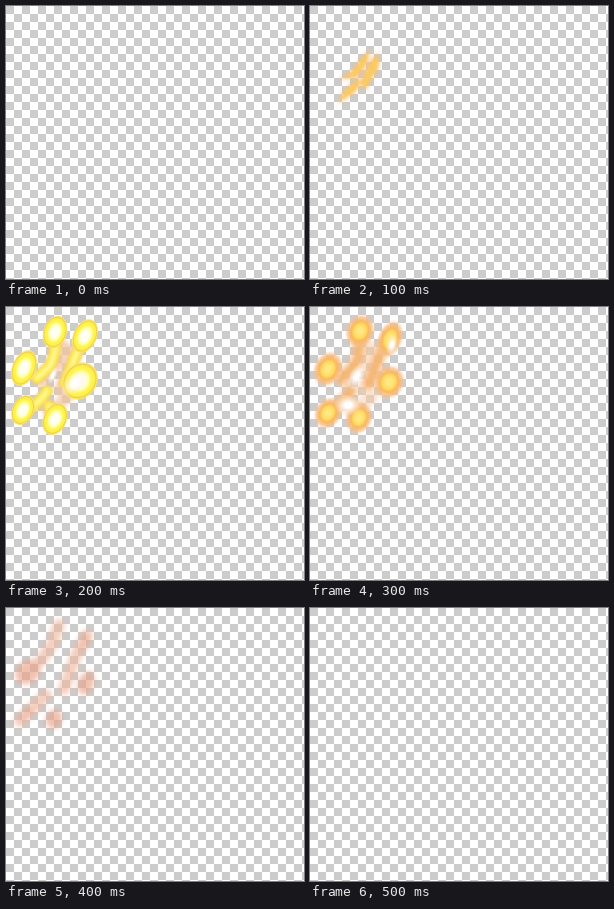
These frames come from a looping animation (298 px wide and 273 px high, 600 ms). An HTML page:

```html
<!DOCTYPE html>
<html lang="en">
<head>
<meta charset="utf-8">
<title>Spark burst</title>
<style>
html, body { margin: 0; width: 100%; height: 100%; overflow: hidden; }
body { background: repeating-conic-gradient(#fff 0 25%, #ccc 0 50%) 0 0 / 16px 16px; }
svg { display: block; width: 298px; height: 273px; }
.pose { opacity: 0; animation: show 600ms step-end infinite; }
#spark { animation-delay: -500ms; }
#burst { animation-delay: -400ms; }
#embers { animation-delay: -300ms; }
#smoke { animation-delay: -200ms; }
@keyframes show { 0% { opacity: 1; } 16.6667%, 100% { opacity: 0; } }
.line { fill: none; stroke-linecap: round; stroke-linejoin: round; }
</style>
</head>
<body>
<svg viewBox="0 0 298 273">
  <defs>
    <filter id="b1" x="-40%" y="-40%" width="180%" height="180%"><feGaussianBlur stdDeviation="1"/></filter>
    <filter id="b2" x="-40%" y="-40%" width="180%" height="180%"><feGaussianBlur stdDeviation="2.3"/></filter>
    <filter id="b3" x="-40%" y="-40%" width="180%" height="180%"><feGaussianBlur stdDeviation="2.8"/></filter>
    <radialGradient id="hot">
      <stop offset=".3" stop-color="#fffff4"/>
      <stop offset=".5" stop-color="#ffffa0"/>
      <stop offset=".62" stop-color="#fff653"/>
      <stop offset=".8" stop-color="#fdf04a"/>
      <stop offset=".88" stop-color="#f3cf48"/>
      <stop offset=".94" stop-color="#fbe56c"/>
      <stop offset="1" stop-color="#fbd878" stop-opacity=".3"/>
    </radialGradient>
    <radialGradient id="warm">
      <stop offset=".15" stop-color="#ffe884"/>
      <stop offset=".4" stop-color="#ffda62"/>
      <stop offset=".56" stop-color="#f9b95c"/>
      <stop offset=".78" stop-color="#f8bc84" stop-opacity=".75"/>
      <stop offset="1" stop-color="#f8c8a0" stop-opacity="0"/>
    </radialGradient>
    <radialGradient id="glow">
      <stop offset=".25" stop-color="#fff"/>
      <stop offset="1" stop-color="#ffe9d2" stop-opacity="0"/>
    </radialGradient>
    <path id="flick" d="M59 46Q57 58 51 65L46 71L33 72Q42 66 47 59Q52 51 59 46ZM67 49Q71 62 63 69L56 82L49 77Q54 72 56 65Q60 55 67 49ZM49 73Q50 81 43 87L30 95Q33 84 40 80Z"/>
    <path id="arms" class="line" d="M49 28Q51 48 43 60L31 71M79 32Q71 43 65 61L59 76M41 84Q35 94 22 103M43 99L47 108"/>
    <path id="haze" class="line" d="M52 35L64 43L52 57L35 75M65 55L54 81L62 90L42 105"/>
    <path id="wisps" class="line" d="M53 17L46 36L36 51L23 64M81 27L71 45L65 61L58 81M40 87L30 97L14 113"/>
  </defs>

  <g id="spark" class="pose">
    <use href="#flick" fill="#f8bd80" stroke="#f8bd80" stroke-width="3" opacity=".6" filter="url(#b2)"/>
    <use href="#flick" fill="#fcc95c" opacity=".9" filter="url(#b1)"/>
  </g>

  <g id="burst" class="pose">
    <use href="#haze" stroke="#f2c4a0" stroke-width="11" opacity=".75" filter="url(#b2)"/>
    <use href="#arms" stroke="#f5ce68" stroke-width="13" opacity=".85" filter="url(#b1)"/>
    <use href="#arms" stroke="#fdee52" stroke-width="9" filter="url(#b1)"/>
    <use href="#arms" stroke="#fff8a0" stroke-width="3" filter="url(#b1)"/>
    <g fill="url(#hot)">
      <ellipse rx="12" ry="17" transform="translate(49 25) rotate(18)"/>
      <ellipse rx="12" ry="18" transform="translate(79 29) rotate(25)"/>
      <ellipse rx="12" ry="19" transform="translate(18 61) rotate(23)"/>
      <ellipse rx="17" ry="20" transform="translate(74 74) rotate(38)"/>
      <ellipse rx="11" ry="16" transform="translate(17 103) rotate(24)"/>
      <ellipse rx="12" ry="17" transform="translate(49 112) rotate(24)"/>
    </g>
    <ellipse fill="url(#glow)" rx="10" ry="16" transform="translate(69 76) rotate(50)"/>
    <ellipse fill="url(#glow)" rx="4" ry="10" transform="translate(47 68) rotate(24)"/>
  </g>

  <g id="embers" class="pose">
    <use href="#haze" stroke="#f8cda9" stroke-width="13" opacity=".55" filter="url(#b2)"/>
    <use href="#arms" stroke="#f7b77c" stroke-width="14" opacity=".7" filter="url(#b2)"/>
    <use href="#arms" stroke="#f4b56d" stroke-width="6" opacity=".75" filter="url(#b1)"/>
    <g fill="url(#warm)">
      <ellipse rx="15" ry="18" transform="translate(50 24) rotate(22)"/>
      <ellipse rx="13" ry="20" transform="translate(80 32) rotate(20)"/>
      <ellipse rx="15" ry="19" transform="translate(18 62) rotate(25)"/>
      <ellipse rx="16" ry="18" transform="translate(79 75) rotate(25)"/>
      <ellipse rx="14" ry="17" transform="translate(18 106) rotate(28)"/>
      <ellipse rx="14" ry="17" transform="translate(49 111) rotate(22)"/>
    </g>
    <g fill="url(#glow)">
      <ellipse rx="14" ry="11" transform="translate(38 98)"/>
      <ellipse rx="8" ry="14" transform="translate(47 69) rotate(25)"/>
      <ellipse rx="6" ry="11" transform="translate(82 38) rotate(15)"/>
    </g>
  </g>

  <g id="smoke" class="pose">
    <g filter="url(#b3)" opacity=".68">
      <use href="#wisps" stroke="#efb9a2" stroke-width="12"/>
      <g fill="#e9a48a">
        <ellipse rx="11" ry="14" transform="translate(22 64) rotate(48)"/>
        <ellipse rx="8" ry="12" transform="translate(80 75) rotate(22)"/>
        <ellipse rx="8" ry="10" transform="translate(48 111) rotate(25)"/>
        <ellipse rx="5" ry="9" transform="translate(79 34) rotate(22)"/>
        <ellipse rx="5" ry="9" transform="translate(20 106) rotate(48)"/>
      </g>
    </g>
  </g>
</svg>
</body>
</html>
```
